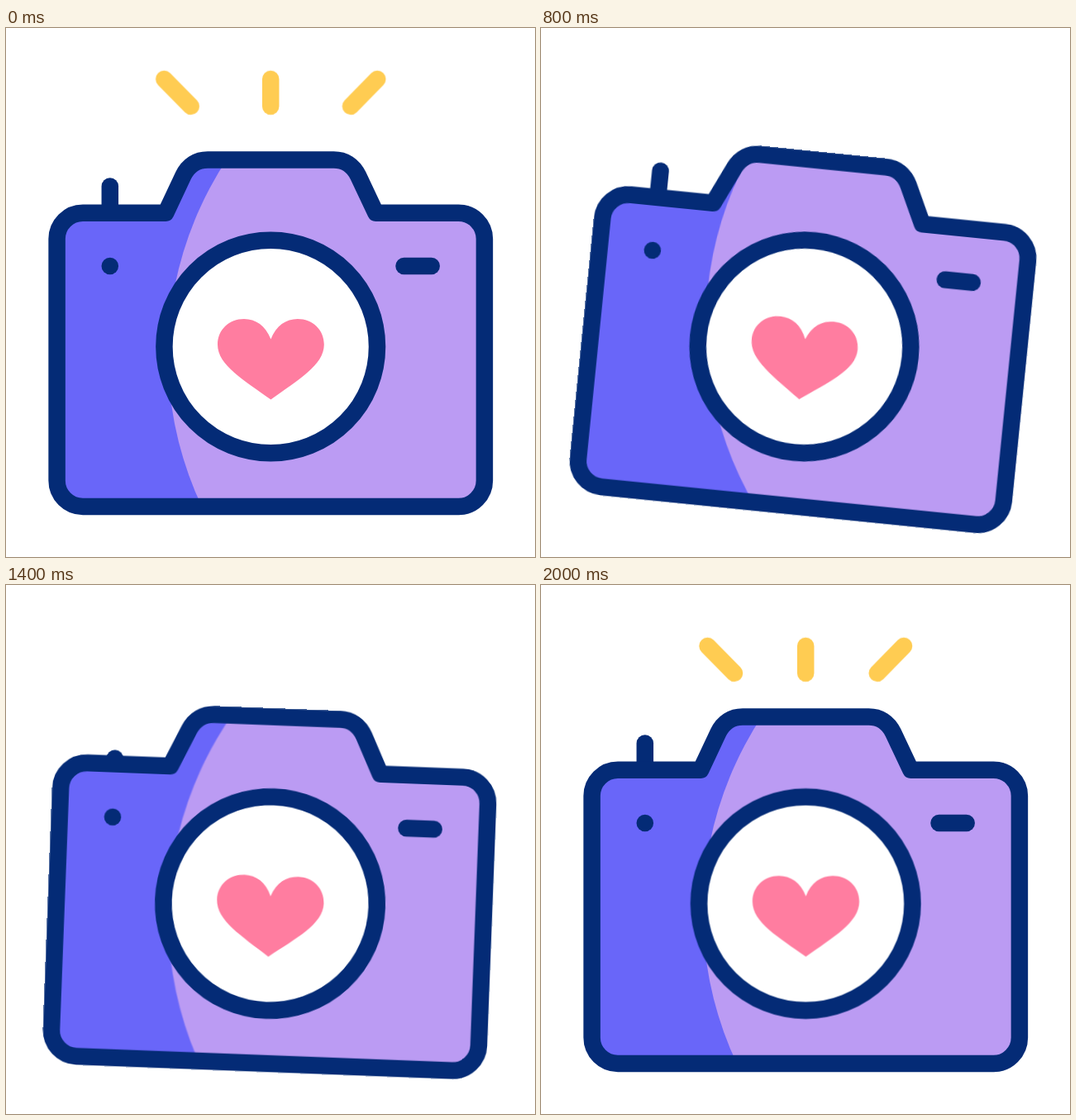
These frames come from a looping animation (640x640 px, 2.04 s). An HTML page:

```html
<!DOCTYPE html>
<html lang="en">
<head>
<meta charset="utf-8">
<title>Camera</title>
<style>
  html, body { margin: 0; width: 100%; height: 100%; overflow: hidden; background: #fff; }
  svg { display: block; width: 100vw; height: 100vh; }

  .line { fill: none; stroke: #042b76; stroke-width: 20.5; stroke-linecap: round; stroke-linejoin: round; }
  .ray { stroke: #ffcc52; animation: fly 2040ms linear infinite; }
  .camera, .light, .button, .lens { animation: 2040ms ease-in-out infinite; }
  .camera { animation-name: shake; transform-origin: 320.2px 369px; }
  .light { animation-name: sway; fill: #bb9bf3; }
  .button { animation-name: press; }
  .lens { animation-name: pulse; transform-origin: 320.2px 385.5px; }

  /* Rays leave over the top edge, then rise again from behind the body. */
  @keyframes fly {
    0%, 100% { transform: none; }
    17.647% { transform: translate(var(--dx), -108px); }
    17.648%, 82.353% { transform: translate(calc(var(--dx) * -1), 108px); }
  }
  @keyframes shake {
    0%, 98.039%, 100% { transform: rotate(0deg); }
    17.647%, 29.412% { transform: rotate(.25deg); }
    41.176% { transform: rotate(6.05deg); }
    56.863% { transform: rotate(-7.7deg); }
    72.549% { transform: rotate(3.6deg); }
    79.412% { transform: rotate(-.2deg); }
    89.216% { transform: rotate(1.35deg); }
  }
  /* The light area swings against the shake. */
  @keyframes sway {
    0%, 98.039%, 100% { transform: translate(0, 0); }
    17.647%, 29.412% { transform: translate(0, -2px); }
    41.176% { transform: translate(1px, -71px); }
    56.863% { transform: translate(-7px, 74px); }
    74.51% { transform: translate(4px, -28px); }
    84.314% { transform: translate(0, -7px); }
    89.216% { transform: translate(0, -14px); }
  }
  @keyframes press {
    0%, 58.824%, 89.7%, 100% { transform: none; }
    73.529% { transform: translateY(33px); }
  }
  @keyframes pulse {
    0%, 66.667%, 100% { transform: scale(1); }
    83.333% { transform: scale(1.117); }
  }
</style>
</head>
<body>
<svg viewBox="0 0 640 640">
  <defs>
    <path id="body" d="M93 223.7H193.3L214.5 178.5C220.5 166 231 159.4 244 159.4H396.5C409.5 159.4 420 166 426 178.5L447.3 223.7H547.5A31.4 31.4 0 0 1 578.9 255.1V547.6A31.4 31.4 0 0 1 547.5 579H93A31.4 31.4 0 0 1 61.6 547.6V255.1A31.4 31.4 0 0 1 93 223.7Z"/>
    <clipPath id="inside"><use href="#body"/></clipPath>
  </defs>

  <path class="line ray" style="--dx: -92px" d="M191.5 62 224 95"/>
  <path class="line ray" style="--dx: 0px" d="M320.2 62V95"/>
  <path class="line ray" style="--dx: 92px" d="M449 62 416.7 95"/>

  <g class="camera">
    <path class="line button" d="M125.8 191.5V223"/>
    <use href="#body" fill="#6966f9"/>
    <g clip-path="url(#inside)"><circle class="light" cx="626" cy="396" r="430"/></g>
    <use href="#body" class="line"/>
    <circle cx="125.8" cy="288" r="10.3" fill="#042b76"/>
    <path class="line" d="M481.5 288H514.7"/>
    <g class="lens">
      <circle class="line" style="fill: #fff" cx="320.2" cy="385.5" r="128.8"/>
      <path fill="#ff7da0" d="M320.4 376.5C314 360 302 352 288 352C270 352 256 365 256 383C256 408 288 426 320.4 449.5C352.8 426 384.8 408 384.8 383C384.8 365 370.8 352 352.8 352C338.8 352 326.8 360 320.4 376.5Z"/>
    </g>
  </g>
</svg>
</body>
</html>
```
